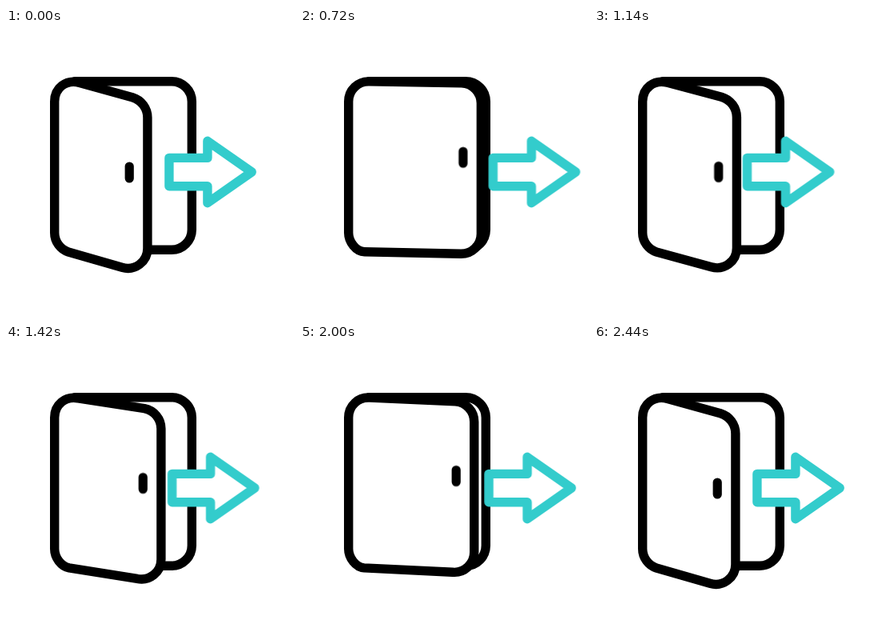
An HTML page for the animation above (2.82 s loop, 360 px wide and 360 px high).

```html
<!DOCTYPE html>
<html lang="en">
<head>
<meta charset="utf-8">
<title>Exit door</title>
<style>
  html, body { margin: 0; width: 100%; height: 100%; overflow: hidden; background: #fff; }
  svg { display: block; width: 100vw; height: 100vh; }
  path { stroke: #000; stroke-width: 11.4; stroke-linecap: round; stroke-linejoin: round; fill: #fff; }

  .door, .handle, .arrow {
    animation: 2820ms cubic-bezier(.3333, 0, .6667, 1) infinite;
  }
  .door { animation-name: swing; }
  .handle { animation-name: follow; stroke-width: 11.2; }
  .arrow { animation-name: slide; stroke: #33cccc; }

  /* four 600 ms moves, then a rest */
  @keyframes swing {
    0%, 42.5532%, 85.1064%, 100% {
      d: path("M60.7 92 C60.7 75 75 63.7 92 68.4 L158 86.7 C169.5 90.2 176.9 100.5 176.9 112 L176.9 275.5 C176.9 292.5 161 303.9 145 299.3 L78 280 C68 276.8 60.7 267 60.7 256 Z");
    }
    21.2766%, 63.8298% {
      d: path("M60.7 92 C60.7 78 72 66.7 86 66.7 L207 66.7 C221 66.7 232.2 78 232.2 92 L232.2 255 C232.2 269 221 280.3 207 280.3 L81 279.8 C70 279.8 60.7 267 60.7 256 Z");
    }
  }
  @keyframes follow {
    0%, 42.5532%, 85.1064%, 100% { transform: translate(0, 0); }
    21.2766%, 63.8298% { transform: translate(55.5px, -21px); }
  }
  @keyframes slide {
    0%, 85.1064%, 100% { transform: translateX(0); }
    21.2766%, 63.8298% { transform: translateX(43.5px); }
    42.5532% { transform: translateX(-14px); }
  }
</style>
</head>
<body>
<svg viewBox="0 0 360 360">
  <path d="M86 66.7 H207 A25.3 25.3 0 0 1 232.3 92 V252 A25.3 25.3 0 0 1 207 277.3 H150"/>
  <path class="door" d="M60.7 92 C60.7 75 75 63.7 92 68.4 L158 86.7 C169.5 90.2 176.9 100.5 176.9 112 L176.9 275.5 C176.9 292.5 161 303.9 145 299.3 L78 280 C68 276.8 60.7 267 60.7 256 Z"/>
  <path class="handle" d="M154.2 173 V188"/>
  <path class="arrow" d="M203.9 162.4 H251.9 V141.3 L307.2 180 L251.9 218.7 V197.7 H203.9 Z"/>
</svg>
</body>
</html>
```
